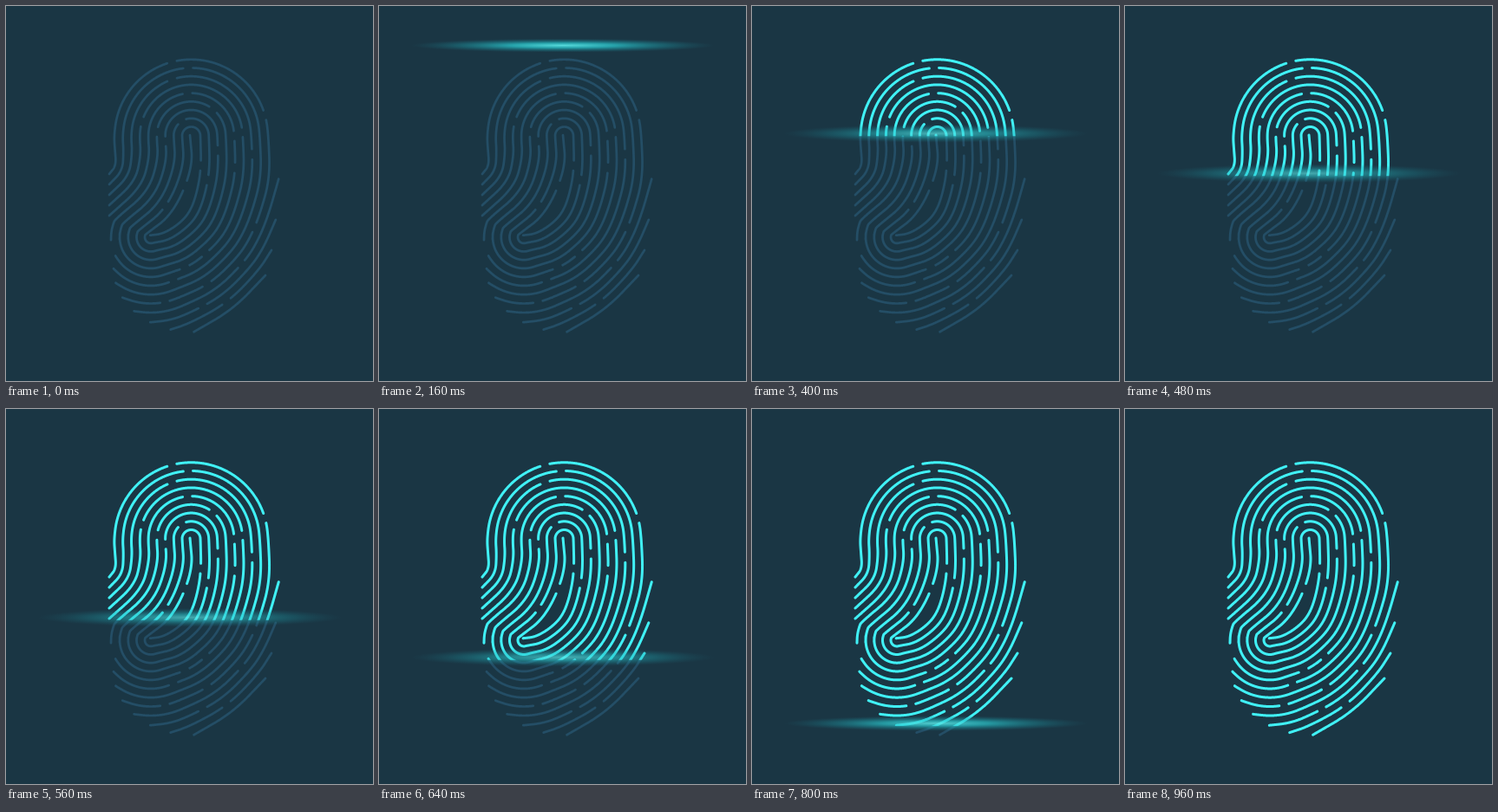
An HTML page with a canvas that plays this animation: 423x433 px, repeating every 1.08 s.

```html
<!DOCTYPE html>
<html lang="en">
<head>
<meta charset="utf-8">
<title>Fingerprint scan</title>
<style>
  html, body { margin: 0; height: 100%; overflow: hidden; background: #1a3644; }
  canvas { display: block; }
</style>
</head>
<body>
<canvas id="stage" width="423" height="433"></canvas>
<script>
const W = 423, H = 433, LOOP = 1080, STEP = 40;
const ctx = document.getElementById('stage').getContext('2d');

const rad = deg => deg * Math.PI / 180;
const mix = (p, q, t) => p.map((v, i) => v + (q[i] - v) * t);

// Ridges are numbered outside in. They arch over an upper centre
// and curl round a lower one; number k of the arch meets k + 2 of the curl.
const arch = (k, deg) => {
  const r = 89 - 9.8 * k;
  return [213.5 + r * Math.cos(rad(deg)), 150 + r * Math.sin(rad(deg))];
};
const curl = (b, deg) => {
  const n = 9 - b, r = 7 + 9.5 * n + 0.07 * n * n, c = Math.cos(rad(deg));
  return [167 + r * c, 267 + r * Math.sin(rad(deg))];
};

function leftSide(k) {
  const foot = k < 5
    ? [[119, 194 + 12 * k]]
    : [176, 188, 200, 207].map(deg => curl(k, deg));
  return [...foot, [127 + 7.3 * k, 184 + 6.2 * k], [125.5 + 10 * k, 165 + 2.4 * k]];
}

function rightSide(b) {
  const t = (b + 2) / 12;
  const points = [
    mix([344, 204], [225, 187], t),
    mix([329, 253], [220, 216], t),
    mix([314.5, 286], [212, 238], t),
    mix([299, 311], [199, 252], t),
    mix([262, 350], [181, 263], t)
  ].slice(Math.max(0, 1 - b));
  const end = b > 9 ? 75 : b > 5 ? 188 : 90.4 + 12.4 * b;
  for (let deg = 66; deg < end; deg += 12) points.push(curl(b, deg));
  points.push(curl(b, end));
  return points;
}

function ridge(k) {
  if (k === 9) return [...leftSide(k), [212, 149]];
  const points = k < 0 ? [] : leftSide(k);
  if (k >= 0) for (let deg = 180; deg <= 360; deg += 15) points.push(arch(k, deg));
  return [...points, ...rightSide(k + 2)];
}

// Quadratic B-spline, sampled finely.
function smooth(points) {
  const p = [points[0], ...points, points[points.length - 1]], out = [];
  for (let i = 1; i < p.length - 1; i++) {
    const from = mix(p[i - 1], p[i], 0.5), to = mix(p[i], p[i + 1], 0.5);
    for (let t = 0; t < 1; t += 1 / 40) {
      out.push(mix(mix(from, p[i], t), mix(p[i], to, t), t));
    }
  }
  return out;
}

// Breaks lie at even steps along a few seams: first point, last point, count.
const seams = [
  [[191, 64], [210, 71], 2],
  [[191, 84], [209, 101], 2],
  [[158, 134], [186, 156], 3],
  [[202, 132], [240, 118], 2],
  [[225, 184], [264, 150], 3],
  [[234, 201], [284, 172], 3],
  [[273, 146], [298, 126], 2],
  [[187, 233], [208, 208], 2],
  [[183, 341], [205, 299], 3],
  [[227, 346], [232, 288], 3],
  [[254, 340], [288, 256], 3]
];

const dist = (p, q) => Math.hypot(p[0] - q[0], p[1] - q[1]);

function buildPrint() {
  const ridges = [];
  for (let k = -4; k <= 9; k++) ridges.push({ points: smooth(ridge(k)), cuts: [] });

  // Each break snaps to the nearest ridge.
  for (const [first, last, count] of seams) {
    for (let i = 0; i < count; i++) {
      const spot = mix(first, last, i / (count - 1));
      let best = Infinity, owner, at;
      for (const r of ridges) for (const p of r.points) {
        const d = dist(p, spot);
        if (d < best) { best = d; owner = r; at = p; }
      }
      owner.cuts.push(at);
    }
  }

  const path = new Path2D();
  for (const { points, cuts } of ridges) {
    let down = false;
    for (const p of points) {
      const cut = cuts.some(c => dist(c, p) < 5.5);
      if (!cut) path[down ? 'lineTo' : 'moveTo'](...p);
      down = !cut;
    }
  }
  return path;
}

const print = buildPrint();
ctx.lineCap = ctx.lineJoin = 'round';

function strokePrint(color, width) {
  ctx.strokeStyle = color;
  ctx.lineWidth = width;
  ctx.stroke(print);
}

// The beam is thin and bright near both ends of its travel.
function drawBeam(y, fade) {
  const edge = Math.min(1, ((y - 217) / 172) ** 2);
  const glow = ctx.createRadialGradient(0, 0, 0, 0, 0, 1);
  glow.addColorStop(0, 'rgba(92,232,232,.95)');
  glow.addColorStop(0.35, 'rgba(42,200,206,.75)');
  glow.addColorStop(0.7, 'rgba(28,150,162,.38)');
  glow.addColorStop(1, 'rgba(27,110,125,0)');
  ctx.save();
  ctx.globalAlpha = fade * (0.68 + 0.3 * edge);
  ctx.translate(212, y);
  ctx.scale(175, 11 - 3 * edge);
  ctx.fillStyle = glow;
  ctx.fillRect(-1, -1, 2, 2);
  ctx.restore();
}

function draw(now) {
  const t = Math.floor((now % LOOP) / STEP) * STEP;
  const scanning = t >= 80 && t < 960;
  const y = 217 + 189.5 * Math.sin(Math.PI * (t - 520) / 1000);
  const reveal = t < 80 ? 0 : scanning ? y + 3 : H;

  ctx.fillStyle = '#1a3644';
  ctx.fillRect(0, 0, W, H);
  strokePrint('#244e66', 2.7);

  ctx.save();
  ctx.beginPath();
  ctx.rect(0, 0, W, reveal);
  ctx.clip();
  strokePrint('#40f1f5', 3);
  ctx.restore();

  if (scanning) drawBeam(y, Math.min(1, (t - 40) / 120, (960 - t) / 140));
  requestAnimationFrame(draw);
}
requestAnimationFrame(draw);
</script>
</body>
</html>
```
